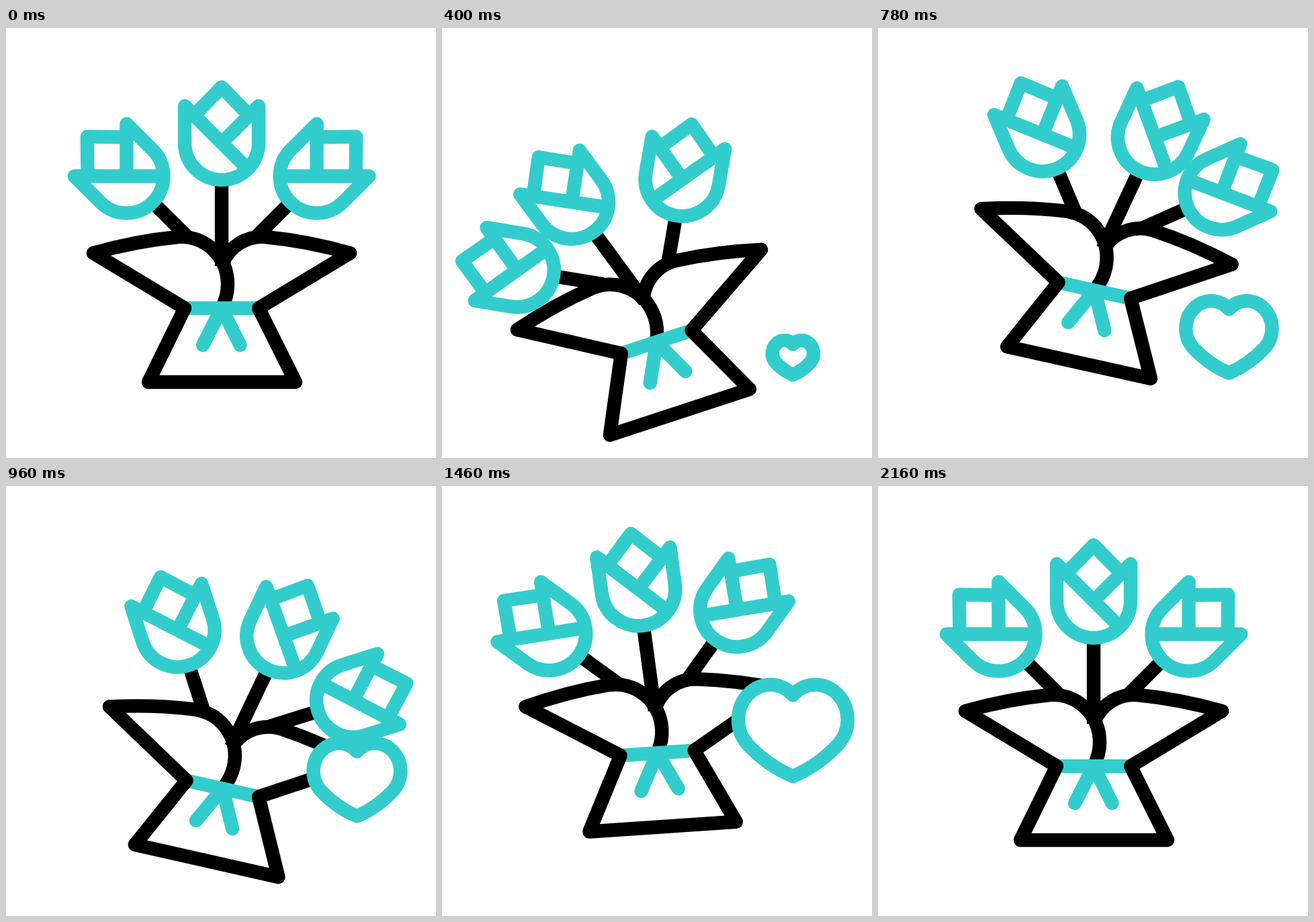
Write an HTML page with a canvas that moves like this. It is 640x640 px and loops after 2.4 s.

```html
<!DOCTYPE html>
<html lang="en">
<head>
<meta charset="utf-8">
<title>Swaying bouquet</title>
<style>
html, body { margin: 0; width: 100%; height: 100%; overflow: hidden; background: #fff; }
canvas { display: block; width: 100vmin; height: 100vmin; }
</style>
</head>
<body>
<canvas id="stage" width="640" height="640"></canvas>
<script>
const ctx = document.getElementById('stage').getContext('2d');
const LOOP = 2400, END = 2160, STEP = 20;
const BLACK = '#000', TEAL = '#33cccc';

// [time in ms, value], eased between neighbours
const SWING = [[0, 0], [410, -18.2], [865, 15.6], [1296, -7.6], [1728, 4], [END, 0]];
const BOUNCE = [[0, 0], [357, 53.5], [717, -34], [1069, 53.2], [1415, -21], [1790, 14], [END, 0]];
const HEART = [[337, 0], [480, 74.5], [830, 63.5], [1670, 84.7], [END, 0]];

const smooth = u => u * u * (3 - 2 * u);

function track(keys, t) {
  if (t <= keys[0][0]) return keys[0][1];
  for (let i = 1; i < keys.length; i++) {
    const [t0, v0] = keys[i - 1], [t1, v1] = keys[i];
    if (t < t1) return v0 + (v1 - v0) * smooth((t - t0) / (t1 - t0));
  }
  return keys[keys.length - 1][1];
}

const leafArcs = new Path2D(
  'M130 335 Q194 317 256 311 C298 309 330 341 330 382 Q330 399 321 417' +
  'M512 335 Q448 317 386 311 C358 309 333 325 323 349');
const wrap = new Path2D('M130 335 L266 417 L212 527 H431 L376 417 L512 335');
const ribbon = new Path2D('M266 417 H376 M293 472 L321 417 L348.5 472');
// Centred on the cup
const tulip = new Path2D(
  'M-55 -55 V0 A55 55 0 0 0 55 0 V-55 L0 0' +
  'M-55 -55 L39 39 M-41 -41 L0 -83 L41 -41');
const heart = new Path2D();
const half = 'M0 -48 C-8 -57 -19 -62 -30 -62 C-54 -62 -73.5 -41 -73.5 -15' +
  'C-73.5 -3 -69 9 -61 18 C-44 36 -24 51 0 61';
heart.addPath(new Path2D(half));
heart.addPath(new Path2D(half), new DOMMatrix([-1, 0, 0, 1, 0, 0]));

function draw(path, color) {
  ctx.strokeStyle = color;
  ctx.stroke(path);
}

function turn(deg, x, y) {
  ctx.translate(x, y);
  ctx.rotate(deg * Math.PI / 180);
  ctx.translate(-x, -y);
}

// Stem foot (x, y) is the pivot; lean is the resting direction
function flower(t, x, y, length, lean, lag) {
  const late = lag * Math.min(1, (END - t) / 400);
  ctx.save();
  turn(track(SWING, t - late), x, y);
  ctx.translate(x, y);
  ctx.rotate(lean * Math.PI / 180);
  ctx.lineCap = 'butt';
  draw(new Path2D(`M0 7 V${55 - length}`), BLACK);
  ctx.lineCap = 'round';
  ctx.translate(0, -length);
  if (lean > 0) ctx.scale(-1, 1);
  draw(tulip, TEAL);
  ctx.restore();
}

function bouquet(t) {
  ctx.save();
  ctx.translate(0, track(BOUNCE, t));
  turn(track(SWING, t), 321, 423);
  draw(leafArcs, BLACK);
  draw(ribbon, TEAL);
  draw(wrap, BLACK);
  flower(t, 321, 347, 176, 0, 0);
  flower(t, 266.3, 307.3, 122.8, -45, 37);
  flower(t, 375.7, 307.3, 122.8, 45, 50);
  ctx.restore();
}

function risingHeart(t) {
  const size = track(HEART, t) / 73.5;
  if (size <= 0) return;
  const u = (t - 360) / (END - 360);
  const rise = u < 0 ? 0 : 0.75 * smooth(u) + 0.25 * u;
  const shape = new Path2D();
  shape.addPath(heart, new DOMMatrix([size, 0, 0, size, 522.3, 492 - 196 * rise]));
  ctx.fillStyle = '#fff';
  ctx.fill(shape);
  draw(shape, TEAL);
}

function render() {
  const now = performance.now() % LOOP;
  const t = Math.min(END, Math.floor(now / STEP) * STEP);
  ctx.fillStyle = '#fff';
  ctx.fillRect(0, 0, 640, 640);
  ctx.lineWidth = 20.4;
  ctx.lineCap = ctx.lineJoin = 'round';
  bouquet(t);
  risingHeart(t);
  requestAnimationFrame(render);
}
render();
</script>
</body>
</html>
```
